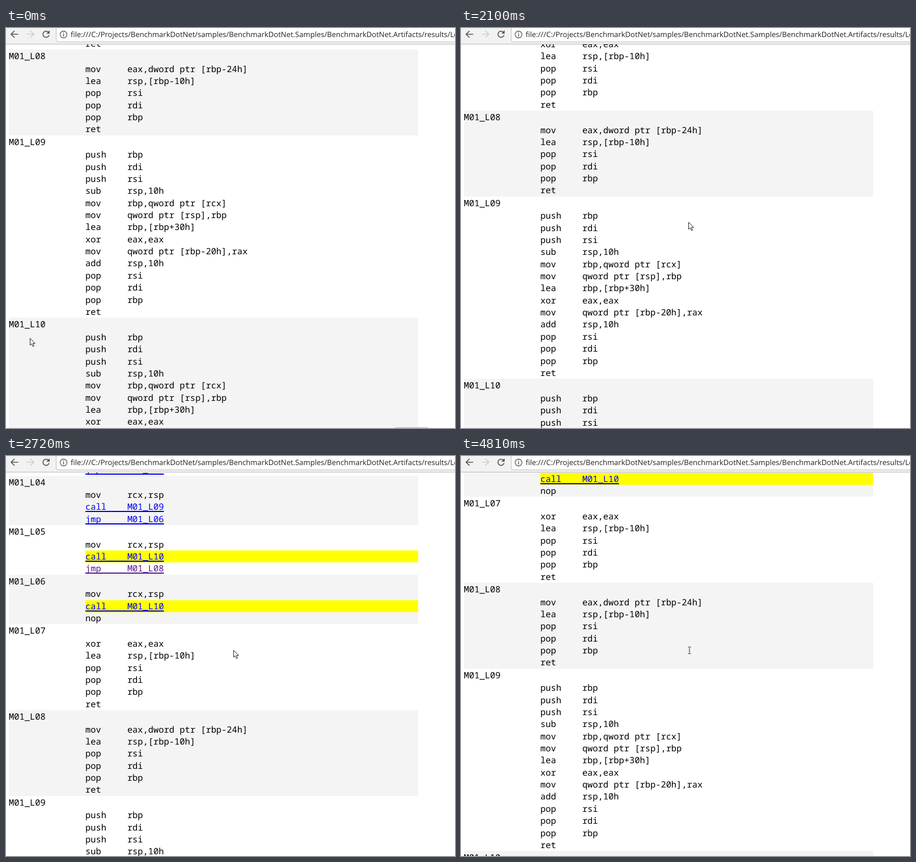
Write an HTML page that moves like this. It is 792 by 707 pixels and loops after 4.89 s.

```html
<!DOCTYPE html>
<html lang="en">
<head>
<meta charset="utf-8">
<title>Disassembly listing</title>
<style>
html, body { margin: 0; width: 100%; height: 100%; overflow: hidden; background: #fff; }
#stage { position: relative; width: 792px; height: 707px; overflow: hidden; background: #fff; text-rendering: geometricPrecision; }

#bar { position: absolute; left: 0; top: 0; width: 792px; height: 29px; }
#url { position: absolute; left: 114px; top: 1px; font: 13.06px/20px "Open Sans", "Noto Sans", sans-serif; color: #222; white-space: pre; }

#view { position: absolute; left: 0; top: 29px; width: 792px; height: 678px; overflow: hidden; }
#list { position: absolute; left: 5px; top: -493px; width: 722px; font: 15.4px "Noto Sans Mono", "DejaVu Sans Mono", monospace; color: #000; white-space: pre; animation: scroll 4890ms step-end infinite; }
.block:nth-child(even) { background: #f4f4f4; }
.label { height: 23.53px; line-height: 23.53px; }
.row { height: 21.37px; line-height: 21.37px; margin-left: 135px; }
.mark { background: #ff0; }
.link { color: #00e; text-decoration: underline 1.5px; text-underline-offset: 2px; text-decoration-skip-ink: none; }
.seen { color: #551a8b; }

#status { position: absolute; left: 687px; top: 706px; width: 58px; height: 1px; background: repeating-linear-gradient(90deg, #777 0 1px, #ddd 1px 2px); animation: status 4890ms step-end infinite; }
#arrow, #beam { position: absolute; left: 0; top: 0; overflow: visible; }
#arrow { animation: move 4890ms step-end infinite, arrow 4890ms step-end infinite; }
#beam { left: 400px; top: 337px; animation: beam 4890ms step-end infinite; }

@keyframes scroll {
  0% { transform: translateY(0); }
  38.03% { transform: translateY(12px); }
  39.67% { transform: translateY(44px); }
  41.30% { transform: translateY(78px); }
  42.94% { transform: translateY(108px); }
  44.58% { transform: translateY(138px); }
  46.21% { transform: translateY(172px); }
  47.64% { transform: translateY(208px); }
  49.28% { transform: translateY(246px); }
  50.71% { transform: translateY(288px); }
  52.35% { transform: translateY(334px); }
  53.98% { transform: translateY(377px); }
  55.62% { transform: translateY(411px); }
  57.05% { transform: translateY(427px); }
  58.69% { transform: translateY(434px); }
  60.32% { transform: translateY(438px); }
  61.75% { transform: translateY(440px); }
  63.39% { transform: translateY(441px); }
  85.68% { transform: translateY(330px); }
  87.11%, 100% { transform: translateY(186px); }
}
@keyframes move {
  0% { transform: translate(42px, 548px); }
  1.43% { transform: translate(44px, 547px); }
  3.06% { transform: translate(50px, 543px); }
  4.70% { transform: translate(58px, 538px); }
  6.33% { transform: translate(66px, 533px); }
  7.77% { transform: translate(72px, 530px); }
  9.40% { transform: translate(75px, 528px); }
  23.72% { transform: translate(130px, 497px); }
  25.35% { transform: translate(250px, 429px); }
  26.99% { transform: translate(362px, 365px); }
  28.83%, 100% { transform: translate(401px, 343px); }
}
@keyframes status { 0% { opacity: 1; } 12.47%, 100% { opacity: 0; } }
@keyframes arrow { 0% { opacity: 1; } 98.36%, 100% { opacity: 0; } }
@keyframes beam { 0% { opacity: 0; } 98.36%, 100% { opacity: 1; } }
</style>
</head>
<body>
<div id="stage">
  <div id="view"><div id="list"></div></div>

  <svg id="bar" viewBox="0 0 792 29" fill="none">
    <path fill="#f2f2f2" d="M0 0H792V28H0z"/>
    <path fill="#fff" stroke="#bdbdbd" d="M88.5 -2V21.5a3 3 0 0 0 3 3H800V-2z"/>
    <path stroke="#b8b8b8" d="M0 28.5H792"/>
    <path stroke="#5a5a5a" stroke-width="1.7" d="M21.5 11H9.5M15 5L9 11l6 6"/>
    <path stroke="#cfcfcf" stroke-width="1.7" d="M36.5 11H48.5M43 5l6 6-6 6"/>
    <path stroke="#5a5a5a" stroke-width="1.7" d="M74.6 7.2A5.5 5.5 0 1 0 76 12.5"/>
    <path fill="#5a5a5a" d="M77 4V10H71z"/>
    <circle cx="101.5" cy="11.5" r="6" stroke="#5a5a5a" stroke-width="1.3"/>
    <path stroke="#5a5a5a" stroke-width="1.5" d="M101.5 10.5V15M101.5 8V9.5"/>
  </svg>
  <div id="url">file:///C:/Projects/BenchmarkDotNet/samples/BenchmarkDotNet.Samples/BenchmarkDotNet.Artifacts/results/Lo</div>

  <div id="status"></div>
  <svg id="arrow" width="11" height="17">
    <path fill="#fff" stroke="#222" d="M.5 .5V12.7l2.8-2.6 2.2 4.9 2-.9-2.1-4.7H9.3z"/>
  </svg>
  <svg id="beam" width="6" height="14">
    <path fill="none" stroke="#222" d="M.5 .5H2.5M3.5 .5H5.5M3 1V12M.5 12.5H2.5M3.5 12.5H5.5"/>
  </svg>
</div>
<script>
const exit = ["lea rsp,[rbp-10h]", "pop rsi", "pop rdi", "pop rbp", "ret"];
const funclet = [
  "push rbp", "push rdi", "push rsi", "sub rsp,10h",
  "mov rbp,qword ptr [rcx]", "mov qword ptr [rsp],rbp",
  "lea rbp,[rbp+30h]", "xor eax,eax", "mov qword ptr [rbp-20h],rax",
  "add rsp,10h", "pop rsi", "pop rdi", "pop rbp", "ret"
];
const load = "mov rcx,rsp";
const blocks = {
  M01_L03: [load, "call M01_L09", "jmp M01_L05"],
  M01_L04: [load, "call M01_L09", "jmp M01_L06"],
  M01_L05: [load, "call M01_L10", "jmp M01_L08"],
  M01_L06: [load, "call M01_L10", "nop"],
  M01_L07: ["xor eax,eax", ...exit],
  M01_L08: ["mov eax,dword ptr [rbp-24h]", ...exit],
  M01_L09: funclet,
  M01_L10: funclet
};

function add(parent, tag, cls, text = "") {
  const el = document.createElement(tag);
  el.className = cls;
  el.textContent = text;
  return parent.appendChild(el);
}

const list = document.getElementById("list");
for (const [name, lines] of Object.entries(blocks)) {
  const block = add(list, "div", "block");
  add(block, "div", "label", name);
  for (const line of lines) {
    const [op, ...args] = line.split(" ");
    const text = args.length ? op.padEnd(8) + args.join(" ") : op;
    const target = args[0] || "";
    const row = add(block, "div", target === "M01_L10" ? "row mark" : "row");
    const link = target.startsWith("M01") ? "link" : "";
    add(row, "span", target === "M01_L08" ? "link seen" : link, text);
  }
}
</script>
</body>
</html>
```
